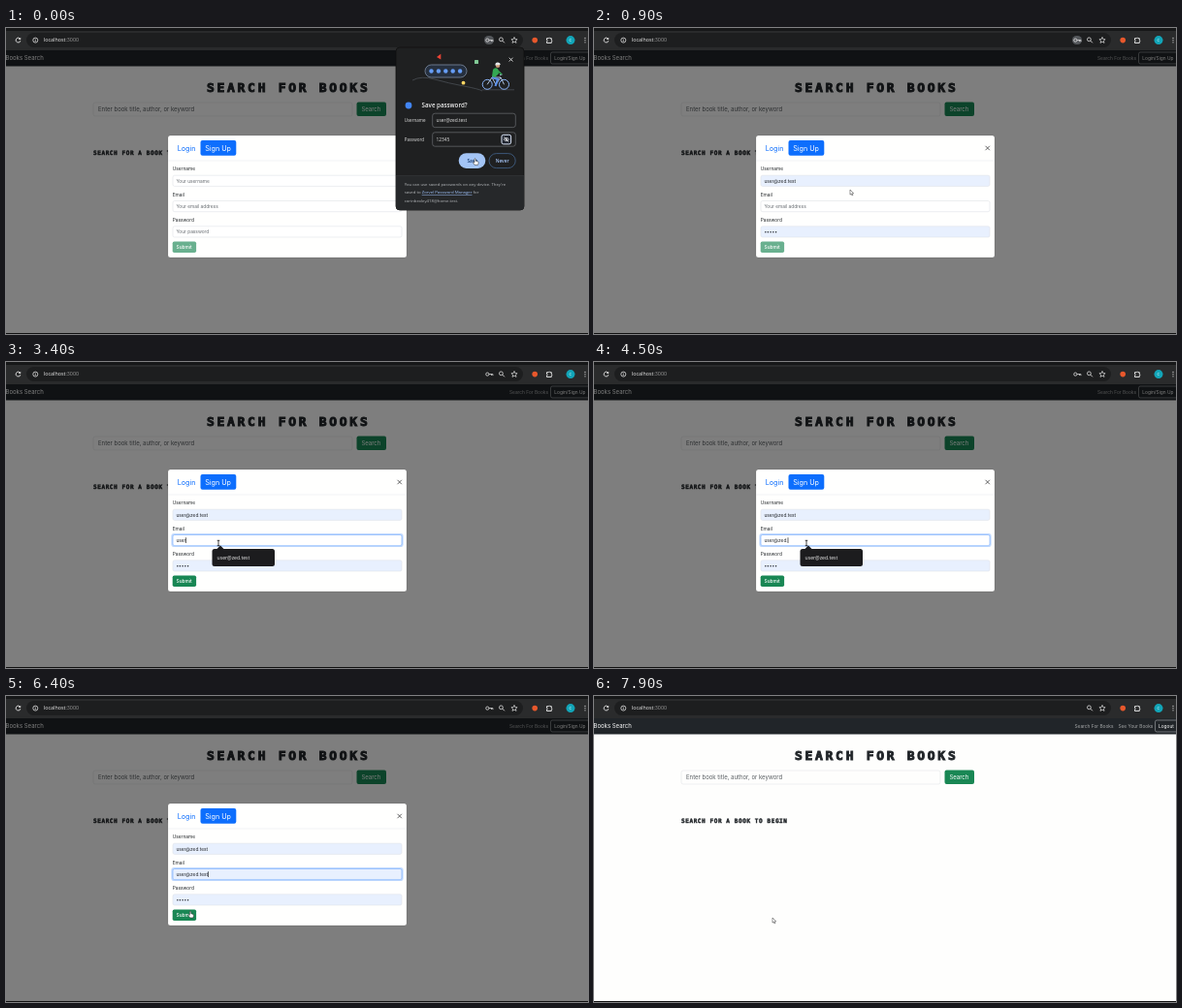
An HTML page with a canvas for the animation above (8 s loop, 600 px wide and 316 px high).

```html
<!DOCTYPE html>
<html lang="en">
<head>
<meta charset="utf-8">
<title>Book search sign-up</title>
<style>
  html, body { margin: 0; height: 100%; overflow: hidden; background: #fff; }
  canvas { display: block; width: 600px; height: 316px; }
</style>
</head>
<body>
<canvas id="stage" width="600" height="316"></canvas>
<script>
const ctx = document.getElementById('stage').getContext('2d');
const LOOP = 8000;
const PAGE = 'Inter, sans-serif', UI = '"Open Sans", sans-serif', MONO = '"DejaVu Sans Mono", monospace';
const EMAIL = 'user@zed.test';
const INK = '#212529', GREEN = '#198754', BLUE = '#0d6efd', LIGHT = '#e3e3e3';

// Times of the hard changes, in ms
const AT = { saved: 300, filled: 600, keyRest: 1300, focus: 1900, type: 2800, pick: 5400,
             picked: 5700, sent: 6900, loggedIn: 7300, loaded: 7500 };
const KEY_GAP = 200;
const MOUSE = [[0, 483, 135], [300, 483, 135], [900, 264, 167], [1600, 219, 187],
               [5800, 219, 187], [6600, 184, 229], [8000, 184, 229]];

function text(str, x, y, size, color, font = PAGE, weight = 400, spacing = 0) {
  ctx.font = `${weight} ${size}px ${font}`;
  ctx.letterSpacing = spacing + 'px';
  ctx.fillStyle = color;
  ctx.fillText(str, x, y);
  return ctx.measureText(str).width;
}

function box(x, y, w, h, r, fill, stroke, line = 0.6) {
  ctx.beginPath();
  ctx.roundRect(x, y, w, h, r);
  if (fill) { ctx.fillStyle = fill; ctx.fill(); }
  if (stroke) { ctx.strokeStyle = stroke; ctx.lineWidth = line; ctx.stroke(); }
}

function disc(x, y, r, fill, stroke, line = 0.8) {
  box(x - r, y - r, 2 * r, 2 * r, r, fill, stroke, line);
}

function path(d, x, y, fill, stroke, line = 0.8) {
  const p = new Path2D(d);
  ctx.save();
  ctx.translate(x, y);
  if (fill) { ctx.fillStyle = fill; ctx.fill(p); }
  if (stroke) { ctx.strokeStyle = stroke; ctx.lineWidth = line; ctx.stroke(p); }
  ctx.restore();
}

const cross = (x, y, r, color) =>
  path(`M${-r} ${-r}L${r} ${r}M${r} ${-r}L${-r} ${r}`, x, y, null, color, 0.9);

function heading(str, x, y, size, spacing) {
  text(str, x, y, size, INK, MONO, 700, spacing);
  ctx.strokeStyle = INK;
  ctx.lineWidth = size / 14;
  ctx.strokeText(str, x, y);
}

function toolbar(t) {
  box(0, 0, 600, 23, 0, '#2a2b2c');
  box(0, 0, 600, 3, 0, '#161718');
  box(21, 5, 512, 15, 7.5, '#1d1e1f');
  if (t >= AT.sent && t < AT.loaded) cross(12.5, 12.5, 2, LIGHT);
  else {
    path('M1.7 -1.8A2.4 2.4 0 1 0 2.4 .5', 12.5, 12.6, null, LIGHT, 0.9);
    path('M2.7 -2.9V-.5H.3z', 12.5, 12.6, LIGHT);
  }
  disc(30.3, 12.6, 2.5, null, LIGHT);
  path('M0 -.3V1.5M0 -1.5V-.9', 30.3, 12.6, null, LIGHT);
  const w = text('localhost', 39, 14.4, 5.35, '#eee', UI);
  text(':3000', 39 + w, 14.4, 5.35, '#999', UI);
  if (t < AT.sent) {
    if (t < AT.keyRest) box(493, 8, 10, 9, 4.5, '#55585c');
    disc(496.3, 12.6, 1.6, null, LIGHT);
    path('M1.6 0H5.6V1.5M4.2 0V1.3', 496.3, 12.6, null, LIGHT);
  }
  disc(510.4, 11.8, 1.9, null, LIGHT);
  path('M1.4 1.4L3.5 3.5', 510.4, 11.8, null, LIGHT, 0.9);
  path('M0 -3.2L.9 -1L3.1 -.9L1.4 .6L2 2.8L0 1.5L-2 2.8L-1.4 .6L-3.1 -.9L-.9 -1z', 524, 12.6, null, LIGHT, 0.7);
  disc(545.2, 12.6, 2.8, '#e8582c');
  path('M-2.5 -1.7H-.8A1 1 0 0 1 1 -1.7H2.3V0A1 1 0 0 1 2.3 1.8V3H-2.5V1.7A1 1 0 0 0 -2.5 -.2z', 560, 12.4, null, '#fff', 0.9);
  disc(582, 12.6, 4.5, '#12a5b8');
  text('C', 580.4, 14.2, 4.3, '#fff', UI);
  for (const y of [10.4, 12.6, 14.8]) disc(597, y, 0.6, LIGHT);
}

function page(loggedIn) {
  box(0, 23, 600, 293, 0, '#fefefd');
  box(0, 23, 600, 16.5, 0, INK);
  text('Books Search', -0.5, 33, 6, '#fff');
  const link = '#a6a8a9';
  if (loggedIn) {
    text('Search For Books', 495.5, 32.6, 4.8, link);
    text('See Your Books', 540.5, 32.6, 4.8, link);
  } else text('Search For Books', 519, 32.6, 4.8, link);
  box(loggedIn ? 578.5 : 561.5, 25, 50, 12, 1.8, null, '#a9adb1');
  text(loggedIn ? 'Logout' : 'Login/Sign Up', loggedIn ? 582 : 565.3, 32.6, 4.8, '#fff');

  heading('SEARCH FOR BOOKS', 207, 66, 13, 2.7);
  box(90, 77, 267, 14, 2, '#fefefd', '#e3e5e8');
  text('Enter book title, author, or keyword', 95, 86.2, 6, '#595e63');
  box(361.5, 76.5, 30.5, 14.5, 2, GREEN);
  text('Search', 366.4, 86.2, 6, '#fff');
  heading('SEARCH FOR A BOOK TO BEGIN', 90, 130.7, 6, 0.6);
}

function field(label, y, hint, value, { filled, focused, caret } = {}) {
  text(label, 171.7, y + 1.6, 4.8, INK);
  if (focused) box(171.2, y + 6, 237.6, 12.4, 2, null, '#c2dafe', 1.6);
  box(172, y + 6.6, 236, 11.2, 1.8, filled ? '#e8f0fe' : '#fff', focused ? '#6fa8fd' : '#dfe3e7');
  const w = text(value || hint, 175.4, y + 13.9, 4.8, value ? INK : '#666b70');
  if (caret) box(175.4 + (value ? w : 0), y + 9.3, 0.6, 5.8, 0, '#000');
}

function modal(t) {
  box(167, 111, 246, 126, 2.5, '#fffffe', 'rgba(0,0,0,.25)', 0.4);
  text('Login', 176.7, 126.5, 7.2, BLUE);
  box(200.5, 116, 36.8, 15.8, 2, BLUE);
  text('Sign Up', 205.2, 126.5, 7.2, '#fff');
  cross(405.7, 124, 2.2, '#555');
  box(167, 136.7, 246, 0.5, 0, '#e3e6e9');

  const filled = t >= AT.filled && t < AT.sent;
  const focused = t >= AT.focus && t < AT.sent;
  const keys = Math.min(EMAIL.length, Math.max(0, Math.floor((t - AT.type) / KEY_GAP) + 1));
  const lastKey = keys ? AT.type + (keys - 1) * KEY_GAP : AT.focus;
  const typed = t < AT.sent ? EMAIL.slice(0, keys) : '';
  field('Username', 145.6, 'Your username', filled && EMAIL, { filled });
  field('Email', 171.9, 'Your email address', typed, {
    filled: t >= AT.picked && t < AT.sent, focused, caret: focused && (t - lastKey) % 1000 < 500 });
  field('Password', 198.2, 'Your password', filled && '•••••', { filled });
  box(171.7, 220.5, 24.4, 11.6, 1.8, typed ? GREEN : '#69b08f');
  text('Submit', 175.6, 228, 4.8, '#fff', PAGE, 500);
  if (t >= AT.focus + 100 && t < AT.picked) suggestions(t);
}

function suggestions(t) {
  const typing = t >= AT.type;
  const fill = t >= AT.pick ? '#414143' : '#1c1c1e';
  path('M-4 4L0 0L4 4z', 221, 189.6, fill);
  box(212.5, 193, typing ? 64.5 : 89, typing ? 18 : 52, 2.5, fill);
  if (typing) return text(EMAIL, 217.6, 204.1, 5.1, '#eee', UI);
  text('corinbexley418@home.test', 217.6, 204.1, 4.95, '#eee', UI);
  text('odettemarlowe3061@home.test', 217.6, 219, 4.95, '#eee', UI);
  box(212.5, 226.3, 89, 0.5, 0, '#4a4a4c');
  disc(222, 235.7, 2.8, '#c8c8c8');
  text('Manage addresses...', 231, 237.4, 4.75, '#bbb', UI);
}

function cyclist() {
  const line = '#8ab4f8';
  disc(496.2, 58.3, 5, null, line, 1);
  disc(513.5, 58.3, 5, null, line, 1);
  path('M496.2 58.3L501 51H510L513.5 58.3M501 51L505 58.5L510 51M509 48.5L511.5 48', 0, 0, null, '#c5d8f5', 0.9);
  path('M501 51L507 53L504.5 60', 0, 0, null, '#5c8fe6', 2.2);
  path('M501 50L502 43Q504 40 507 42L508 47L504 51z', 0, 0, '#34a853');
  path('M506 43L511 48', 0, 0, null, '#34a853', 1.6);
  disc(507, 38.8, 2.2, '#c99a78');
  path('M504.4 38.4A2.7 2.7 0 0 1 509.8 38z', 0, 0, '#e8eaed');
}

function passwordBubble() {
  box(402, 20, 132, 168, 4, '#1f2021', '#111', 0.8);
  path('M402 152.5H534V184A4 4 0 0 1 530 188H406A4 4 0 0 1 402 184z', 0, 0, '#26282a');
  path('M419 54Q428 49 442 53T472 60T491 65M491 63.8H524', 0, 0, null, '#4a4f55', 0.8);
  path('M444 30L448.3 26.8V32.5z', 0, 0, '#ea4335');
  box(483, 33, 4, 4, 0.5, '#81c995');
  disc(471.5, 56.7, 1.9, '#fdd663');
  box(432, 38, 43, 13, 6.5, '#26303f', '#7c8ba1', 0.8);
  for (let i = 0; i < 5; i++) disc(438.5 + i * 7.4, 44.5, 2.2, '#669df6');
  cyclist();
  cross(520.6, 32.6, 1.9, LIGHT);

  disc(415, 80, 3.4, '#4285f4');
  text('Save password?', 428.6, 82.4, 6.2, '#eee', UI, 600);
  for (const [label, value, y] of [['Username', EMAIL, 95.4], ['Password', '12345', 115]]) {
    text(label, 410.7, y + 1.7, 4.5, LIGHT, UI);
    box(439.7, y - 7.2, 85.6, 14.4, 2.5, null, '#777b80');
    text(value, 443.5, y + 1.7, 4.8, LIGHT, UI);
  }
  box(511, 110.3, 9.6, 9.6, 1.8, '#202530', '#dce6f8', 1);
  path('M-2.7 0Q0 -3.3 2.7 0Q0 3.3 -2.7 0M-2.6 -2.6L2.6 2.6', 515.8, 115.1, null, '#fff', 0.7);
  disc(515.8, 115.1, 0.9, '#fff');

  box(466.7, 129.3, 27.6, 15.6, 7.8, '#a3c4f5');
  text('Save', 475.4, 138.9, 4.8, '#12376b', UI, 600);
  box(498, 129.6, 27.2, 15, 7.5, null, '#45658f', 0.8);
  text('Never', 504.7, 138.9, 4.8, '#a8c7fa', UI, 600);

  const soft = '#b4b7ba', size = 4.3;
  box(402, 152.2, 132, 0.5, 0, '#3b3d40');
  text("You can use saved passwords on any device. They're", 410.7, 162.8, size, soft, UI);
  let x = 410.7 + text('saved to ', 410.7, 171.2, size, soft, UI);
  const w = text('Zorvel Password Manager', x, 171.2, size, '#9dc0f8', UI);
  box(x, 172, w, 0.4, 0, '#9dc0f8');
  text(' for', x + w, 171.2, size, soft, UI);
  text('corinbexley418@home.test.', 410.7, 179.6, size, soft, UI);
}

function pointer(t) {
  const i = MOUSE.findIndex(([at], n) => n + 1 < MOUSE.length && t < MOUSE[n + 1][0]);
  const [t0, x0, y0] = MOUSE[i], [t1, x1, y1] = MOUSE[i + 1];
  const p = (t - t0) / (t1 - t0), ease = p * p * (3 - 2 * p);
  const x = x0 + (x1 - x0) * ease, y = y0 + (y1 - y0) * ease;
  const inModal = t < AT.loggedIn;
  if (t < AT.saved || (inModal && x < 196 && y > 221))
    path('M0 0Q.9 -.7 1.3 .3V2.2L3.7 2.9Q4.3 3.3 4 5L3.4 6.5H.2L-1.5 3.9Q-1.2 3 0 3.9z', x, y, '#fff', '#222', 0.5);
  else if (inModal && x < 408 && y > 178.5 && y < 189.7)
    path('M-1.3 -2.7H1.3M0 -2.7V2.7M-1.3 2.7H1.3', x, y, null, '#111', 0.8);
  else
    path('M0 0V5.2L1.2 4.1L2 6L2.9 5.6L2.1 3.8H3.7z', x, y, '#fff', '#333', 0.5);
}

function draw(t) {
  page(t >= AT.loggedIn);
  if (t < AT.loggedIn) {
    box(0, 23, 600, 293, 0, 'rgba(0,0,0,.5)');
    modal(t);
  }
  box(0, 315, 600, 1, 0, '#111');
  toolbar(t);
  if (t < AT.saved) passwordBubble();
  pointer(t);
}

const start = performance.now();
(function tick() {
  draw((performance.now() - start) % LOOP);
  requestAnimationFrame(tick);
})();
</script>
</body>
</html>
```
